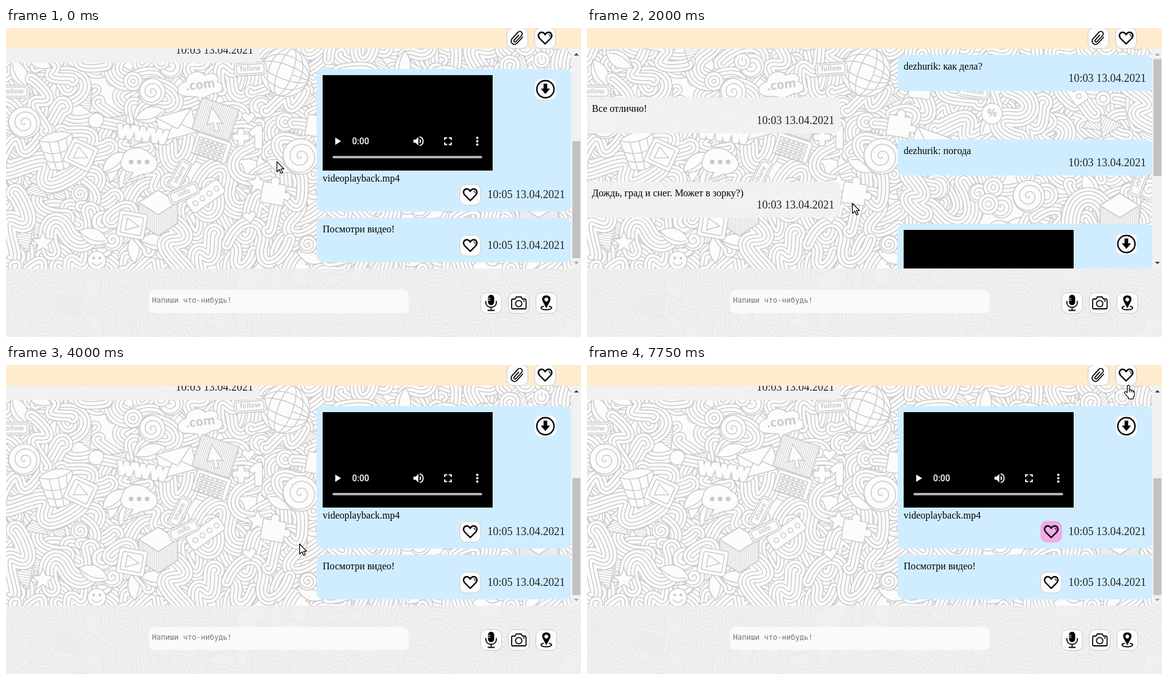
Recreate the animation shown at these times as an HTML page with a canvas. Size 937 by 505 pixels, loop 8 s.

```html
<!DOCTYPE html>
<html lang="ru">
<head>
<meta charset="utf-8">
<title>Чат</title>
<style>
html, body { margin: 0; width: 100%; height: 100%; overflow: hidden; background: #fcfcfc; }
canvas, svg#ui { position: absolute; left: 0; top: 0; width: 937px; height: 505px; }
.msg { font: 16px "Liberation Serif", "Times New Roman", serif; fill: #000; }
.time { font: 18px "Liberation Serif", "Times New Roman", serif; fill: #222; text-anchor: end; }
.hint { font: 12px "DejaVu Sans Mono", monospace; fill: #757575; }
.clock { font: 500 14px Roboto, sans-serif; fill: #fff; }
.line { fill: none; stroke: #0a0a0a; stroke-width: 2.4; stroke-linecap: round; stroke-linejoin: round; }
.thin { stroke-width: 1.8; }
.hair { stroke-width: 1.2; }
.btn { fill: #fcfcfc; stroke: #c9c9c9; }
.liked .btn { fill: #f2abe6; stroke: #e5a5dc; }
</style>
</head>
<body>
<canvas id="paper" width="937" height="505"></canvas>
<svg id="ui" viewBox="0 0 937 505"></svg>
<script>
// ---------- Doodle wallpaper ----------
const g = document.getElementById('paper').getContext('2d');
const INK = '#cacaca', PAPER = '#fcfcfc', PEN = 1.5;
let seed = 41;
const rnd = (a = 1, b = 0) => {
  seed = (seed * 16807) % 2147483647;
  return b + (a - b) * (seed / 2147483647);
};

function at(x, y, deg, draw) {
  g.save();
  g.translate(x, y);
  g.rotate(deg * Math.PI / 180);
  g.lineWidth = PEN;
  g.strokeStyle = INK;
  draw();
  g.restore();
}
function shape(path, fill = PAPER) {
  const p = typeof path === 'string' ? new Path2D(path) : path;
  g.lineWidth = PEN;
  g.strokeStyle = INK;
  g.fillStyle = fill;
  if (fill) g.fill(p);
  g.stroke(p);
}
function disc(r, x = 0, y = 0, fill = PAPER) {
  const p = new Path2D();
  p.arc(x, y, r, 0, 7);
  shape(p, fill);
}
function box(w, h, r = 4) {
  const p = new Path2D();
  p.roundRect(-w / 2, -h / 2, w, h, r);
  shape(p);
}
function hatch(path, gap = 4) {
  const p = new Path2D(path);
  shape(p);
  g.save();
  g.clip(p);
  g.lineWidth = 1;
  g.beginPath();
  for (let i = -90; i < 90; i += gap) { g.moveTo(i, -70); g.lineTo(i, 70); }
  g.stroke();
  g.restore();
}
function label(text, size, outline = false) {
  g.font = `bold ${size}px "Open Sans", sans-serif`;
  g.textAlign = 'center';
  g.textBaseline = 'middle';
  g.lineJoin = 'round';
  if (outline) {
    for (const [w, c] of [[7, INK], [4, PAPER]]) {
      g.lineWidth = w;
      g.strokeStyle = c;
      g.strokeText(text, 0, 0);
    }
  }
  g.fillStyle = outline ? PAPER : INK;
  g.fillText(text, 0, 0);
}
function spiral(r) {
  disc(r);
  g.beginPath();
  for (let a = 0; a < 16; a += .2) g.lineTo(Math.cos(a) * r * a / 16, Math.sin(a) * r * a / 16);
  g.stroke();
}
// Nested strokes leave parallel lines along one curve.
function ribbon(w) {
  const p = new Path2D(), k = rnd(50, 26), s = rnd() < .5 ? -1 : 1;
  p.moveTo(-k, k * .5);
  p.bezierCurveTo(-k, -k * s, k * .2, -k, k * .3, 0);
  p.bezierCurveTo(k * .4, k, k * 1.3, k * .6 * s, k * 1.2, -k * .6);
  g.lineCap = 'round';
  for (let i = w; i > 4; i -= 12) {
    for (const [d, c] of [[0, INK], [2 * PEN, PAPER]]) {
      g.lineWidth = i - d;
      g.strokeStyle = c;
      g.stroke(p);
    }
  }
}
const heart = 'M0 10L-10 -1C-13 -7-5 -12 0 -5C5 -12 13 -7 10 -1Z';
const star = 'M0 -18L5 -6L18 -5L8 4L12 17L0 9L-12 17L-8 4L-18 -5L-5 -6Z';
const fillers = [
  () => ribbon(20), () => ribbon(20), () => ribbon(32), () => ribbon(32),
  () => spiral(rnd(22, 12)),
  () => { for (let r = rnd(22, 12); r > 2; r -= 6) disc(r); },
  () => hatch('M-20 14L0 -20L20 14Z'),
  () => { shape('M-26 0Q0 -26 26 0Q0 26 -26 0Z'); shape('M-20 0Q0 -12 26 0', null); },
];
const bubble = () => {
  shape('M-10 19L-17 31L5 22C34 22 36 -3 18 -11C6 -27 -26 -22 -27 -5C-35 9 -26 18 -10 19Z');
  [-13, 0, 13].forEach(x => disc(3, x, 2, INK));
};
const button = text => () => { box(52, 21, 6); box(45, 15, 4); label(text, 11); };
const plusOne = () => label('+1', 46, true);
const tile = () => { box(46, 42, 4); box(34, 30, 3); shape('M-9 -10L12 0L-9 10Z'); };
const screen = () => {
  hatch('M-32 -28L32 -28L32 26L-32 26Z', 3);
  shape('M-12 -18L14 2L4 4L11 15L5 18L-1 6L-10 12Z');
};
const keys = () => {
  box(58, 36, 3);
  for (let y = -12; y < 14; y += 8) for (let x = -24; x < 24; x += 8) g.strokeRect(x, y, 6, 5);
};
const globe = () => {
  disc(40);
  for (const k of [12, 27]) {
    g.beginPath();
    g.ellipse(0, 0, k, 40, 0, 0, 7);
    g.ellipse(0, 0, 40, k, 0, 0, 7);
    g.stroke();
  }
};
const puzzle = () => shape('M-20 -14L-7 -14C-13 -28 11 -28 5 -14L18 -14L18 -2C31 -8 31 15 18 9L18 20L-20 20Z');
const block = () => { hatch('M-32 0L0 -20L32 0L32 34L0 55L-32 34Z', 3); shape('M-32 0L0 -20L32 0L0 20Z'); };
const eye = () => { shape('M-30 0Q0 -36 30 0Q0 32 -30 0Z'); disc(13); disc(6, 0, 0, INK); };
const cloud = () => {
  shape('M-28 14C-45 10 -38 -9 -23 -9C-19 -26 3 -27 9 -16C28 -22 34 -8 28 -3C43 4 33 19 20 15L4 20L-4 29L-7 18Z');
  label('.com', 20);
};
const mail = () => { box(60, 40, 2); shape('M-30 -20L0 7L30 -20M-30 20L-7 1M30 20L7 1', null); };
const basket = () => {
  shape('M-28 -22Q0 -38 28 -22L20 27Q0 38 -20 27Z');
  shape('M-28 -22Q0 -8 28 -22M-24 -2Q0 11 24 -2M-22 13Q0 25 22 13M-12 -17L-9 31M3 -15L3 32M17 -18L13 31', null);
};
const smile = () => { disc(15); shape('M-8 3Q0 13 8 3', null); disc(1.5, -5, -4, INK); disc(1.5, 5, -4, INK); };
const power = () => { disc(13); shape('M-4 -5A7 7 0 1 0 4 -5M0 -8L0 0', null); };
const tower = () => { box(26, 64, 5); for (let y = -22; y < 28; y += 14) disc(4, 0, y); };

function paintPaper() {
  g.fillStyle = PAPER;
  g.fillRect(0, 0, 937, 505);
  for (let i = 0; i < 620; i++) {
    at(rnd(960, -20), rnd(530, -10), rnd(360), fillers[Math.floor(rnd(fillers.length))]);
  }
  const landmarks = [
    [455, 72, 20, globe], [317, 94, -7, cloud], [398, 67, -4, button('follow')],
    [147, 153, 0, () => label('@', 24, true)], [85, 200, -12, basket], [122, 207, 25, tile],
    [278, 158, -15, mail], [335, 196, 18, keys], [341, 150, 18, screen],
    [222, 176, 8, () => label('WWW', 28, true)], [217, 217, 0, bubble],
    [396, 183, 0, plusOne], [480, 210, 0, () => spiral(29)],
    [248, 285, 0, block], [325, 275, 55, tower],
    [283, 240, -62, button('share')], [290, 270, -25, button('info')],
    [410, 254, 0, () => shape(star)], [437, 268, 10, puzzle],
    [397, 309, -10, () => shape(heart)], [395, 147, 0, () => shape(heart)],
    [205, 322, 10, tile], [148, 380, 0, smile],
    [30, 155, 0, () => spiral(26)], [12, 104, 0, button('follow')],
    [510, 158, 10, puzzle], [543, 97, 8, () => { box(36, 36); label('+1', 20); }],
    [630, 104, 8, button('follow')], [712, 80, -25, eye], [873, 52, 0, power],
    [253, 55, 0, power], [660, 140, 0, () => { disc(17); label('%', 18); }],
    [790, 95, -35, tower], [833, 208, 0, bubble], [900, 250, -70, button('info')],
    [868, 290, 0, block], [560, 190, 20, mail], [720, 275, 0, () => spiral(26)],
    [60, 350, 0, () => shape(star)], [468, 440, 0, cloud], [105, 450, 12, keys],
  ];
  landmarks.forEach(m => at(...m));
}
paintPaper();

// ---------- Interface ----------
const rect = (x, y, w, h, fill, r = 0) =>
  `<rect x="${x}" y="${y}" width="${w}" height="${h}" rx="${r}" fill="${fill}"/>`;
const text = (cls, x, y, s) => `<text class="${cls}" x="${x}" y="${y}">${s}</text>`;
const line = (d, weight = '') => `<path class="line ${weight}" d="${d}"/>`;
const icons = {
  heart: line('M17.5 27L8.5 18C4.5 13.5 7.5 8 11.8 8C14.8 8 16.5 10 17.5 12C18.5 10 20.2 8 23.2 8C27.5 8 30.5 13.5 26.5 18Z') +
    line('M23 11.5Q26 12 25.4 15', 'hair'),
  clip: `<g transform="translate(17 17.5) rotate(42)">${
    line('M5.5 -7V6.5A5.5 5.5 0 0 1 -5.500 6.500V-8A4 4 0 0 1 2.500 -8V5.500A2 2 0 0 1 -1.500 5.500V-5', 'thin')}</g>`,
  mic: '<rect x="12.5" y="4" width="10" height="17" rx="5"/>' +
    line('M9 15V17A8.5 7.5 0 0 0 26 17V15M17.5 25V29M12.5 29.500H22.500', 'thin') +
    '<path d="M12.500 10h4M12.500 13h4" stroke="#fff"/>',
  camera: line('M6 12.5Q6 11 8 11H11.5L13.5 7.5H21.5L23.5 11H27Q29.5 11 29.5 13V25Q29.5 27 27.5 27H8Q6 27 6 25Z', 'thin') +
    '<circle class="line thin" cx="17.5" cy="18.5" r="5.2"/><circle cx="26" cy="14" r="1.2"/>',
  pin: line('M12.500 23Q8 24 9 26Q11 28.500 17.500 28.500T26 26Q27 24 22.500 23', 'thin') +
    '<path fill-rule="evenodd" d="M17.5 26L12 15.5C8.5 9 12.5 5 17.5 5S26.5 9 23 15.5ZM17.5 8.5a3.200 3.200 0 1 0 .01 0Z"/>',
};
const button35 = (x, y, icon, id = '') =>
  `<g id="${id}" transform="translate(${x} ${y})"><rect class="btn" x=".5" y=".5" width="34" height="34" rx="10"/>${icons[icon]}</g>`;

const mine = (y, h) => rect(506, y, 415, h, '#d0edff', 10);
const said = (y, s, time) => mine(y, 59) + text('msg', 516, y + 24, s) + text('time', 911, y + 44, time);
const heard = (y, s, time) => rect(-12, y, 425, 59, 'rgba(242,242,242,.95)', 10) +
  text('msg', 8, y + 24, s) + text('time', 403, y + 44, time);

const player = y => rect(516, y, 277, 156, '#000') + `<g transform="translate(516 ${y})" fill="#fff">
  <path d="M20.500 102V114L30 108Z"/>
  <path d="M148 105.500V110.500H151.500L156 115V101L151.500 105.500ZM158 104.300A4 4 0 0 1 158 111.700Z"/>
  <path d="M158 100.800A7.400 7.400 0 0 1 158 115.200" fill="none" stroke="#fff" stroke-width="1.800"/>
  <path d="M199 106V102.500H203M205.500 102.500H209.500V106M209.500 110V113.500H205.500M203 113.500H199V110" fill="none" stroke="#fff" stroke-width="2"/>
  <circle cx="252" cy="102.500" r="1.900"/><circle cx="252" cy="108" r="1.900"/><circle cx="252" cy="113.500" r="1.900"/>
  ${rect(16, 132, 244, 4, '#b3b3b3', 2)}${text('clock', 48, 113, '0:00')}</g>`;
const download = y => rect(862, y - 17, 34, 34, '#fafcfd', 9) +
  `<circle class="line" cx="879" cy="${y}" r="14"/>
   <path d="M876 ${y - 9}h6v8h4.500L879 ${y + 8}l-7.500 -9H876Z"/>`;

const early = '10:03 13.04.2021', late = '10:05 13.04.2021';
const feed = said(-209, 'dezhurik: как дела?', early) +
  heard(-140, 'Все отлично!', early) +
  said(-71, 'dezhurik: погода', early) +
  heard(-2, 'Дождь, град и снег. Может в зорку?)', early) +
  mine(67, 233) + player(77) + download(100) +
  text('msg', 516, 251, 'videoplayback.mp4') + button35(739, 255, 'heart', 'like') + text('time', 911, 278, late) +
  mine(310, 73) + text('msg', 516, 334, 'Посмотри видео!') +
  button35(739, 338, 'heart') + text('time', 911, 361, late);

const ui = document.getElementById('ui');
ui.innerHTML = `
  <clipPath id="view"><rect y="34" width="922" height="359"/></clipPath>
  <g clip-path="url(#view)"><g id="feed">${feed}</g></g>
  ${rect(921, 34, 16, 359, '#f1f1f1')}
  <rect id="thumb" x="923" y="185" width="13" height="191" fill="#c1c1c1"/>
  <path id="up" d="M925.500 45L929.500 41L933.500 45Z"/>
  <path id="down" d="M925.500 382L929.500 386L933.500 382Z"/>
  ${rect(0, 0, 937, 34, '#ffebcd')}
  ${button35(816, -1, 'clip')}${button35(861, -1, 'heart')}
  ${rect(0, 393, 937, 112, 'rgba(238,238,238,.88)')}
  ${rect(233, 428, 423, 38, '#fafafa', 9)}${text('hint', 238, 449, 'Напиши что-нибудь!')}
  ${button35(773, 432, 'mic')}${button35(818, 432, 'camera')}${button35(863, 432, 'pin')}
  <g id="cursor" fill="#fff" stroke="#000" stroke-width="1.2" stroke-linejoin="round">
    <path id="arrow" d="M.5 .5V17L4.500 13.300L7.200 19.500L9.800 18.300L7.100 12.400H12Z"/>
    <g id="hand"><path d="M5.500 13V2.500Q7 -.5 9 2V9Q11.500 7.500 12.200 9.700Q14.400 8.600 15 10.600Q17.200 10.300 17 13V17Q16.800 19.500 15 21.500V23.500H7.500V21.500Q4 18 1 14Q.2 11.400 2.600 11.600Z"/>
    <path d="M9 9V12.500M12.200 10V12.500M15 11V13" fill="none"/></g>
  </g>`;

// ---------- Timeline ----------
const LOOP = 8000;
// time, distance scrolled up from the end
const scrolls = [[0, 0], [1000, 54], [1250, 125], [1500, 195], [1750, 243], [2000, 253],
  [3000, 190], [3250, 64], [3500, 10], [3750, 0]];
// time, x, y, pointer over a control
const moves = [[0, 441, 218], [250, 417, 281], [500, 431, 286], [750, 432, 281], [1000, 432, 286],
  [4000, 478, 292], [4250, 562, 300], [4500, 670, 283], [4750, 751, 275, 1], [5000, 764, 281, 1],
  [5750, 751, 275, 1], [6750, 728, 281], [7000, 782, 243], [7250, 834, 162], [7500, 850, 75], [7750, 875, 32, 1]];
const LIKED_AT = 5750;
const current = (steps, t) => steps.findLast(s => s[0] <= t);
const el = id => document.getElementById(id);

function draw(now) {
  const t = now % LOOP;
  const up = current(scrolls, t)[1];
  const [, x, y, hand] = current(moves, t);
  el('feed').setAttribute('transform', `translate(0 ${up})`);
  el('thumb').setAttribute('y', Math.round(185 - up * 134 / 253));
  el('up').setAttribute('fill', up === 253 ? '#a3a3a3' : '#404040');
  el('down').setAttribute('fill', up === 0 ? '#a3a3a3' : '#404040');
  el('like').setAttribute('class', t >= LIKED_AT ? 'liked' : '');
  el('cursor').setAttribute('transform', `translate(${x} ${y})`);
  el('arrow').style.display = hand ? 'none' : '';
  el('hand').style.display = hand ? '' : 'none';
}
const start = performance.now();
(function tick() {
  draw(performance.now() - start);
  requestAnimationFrame(tick);
})();
</script>
</body>
</html>
```
